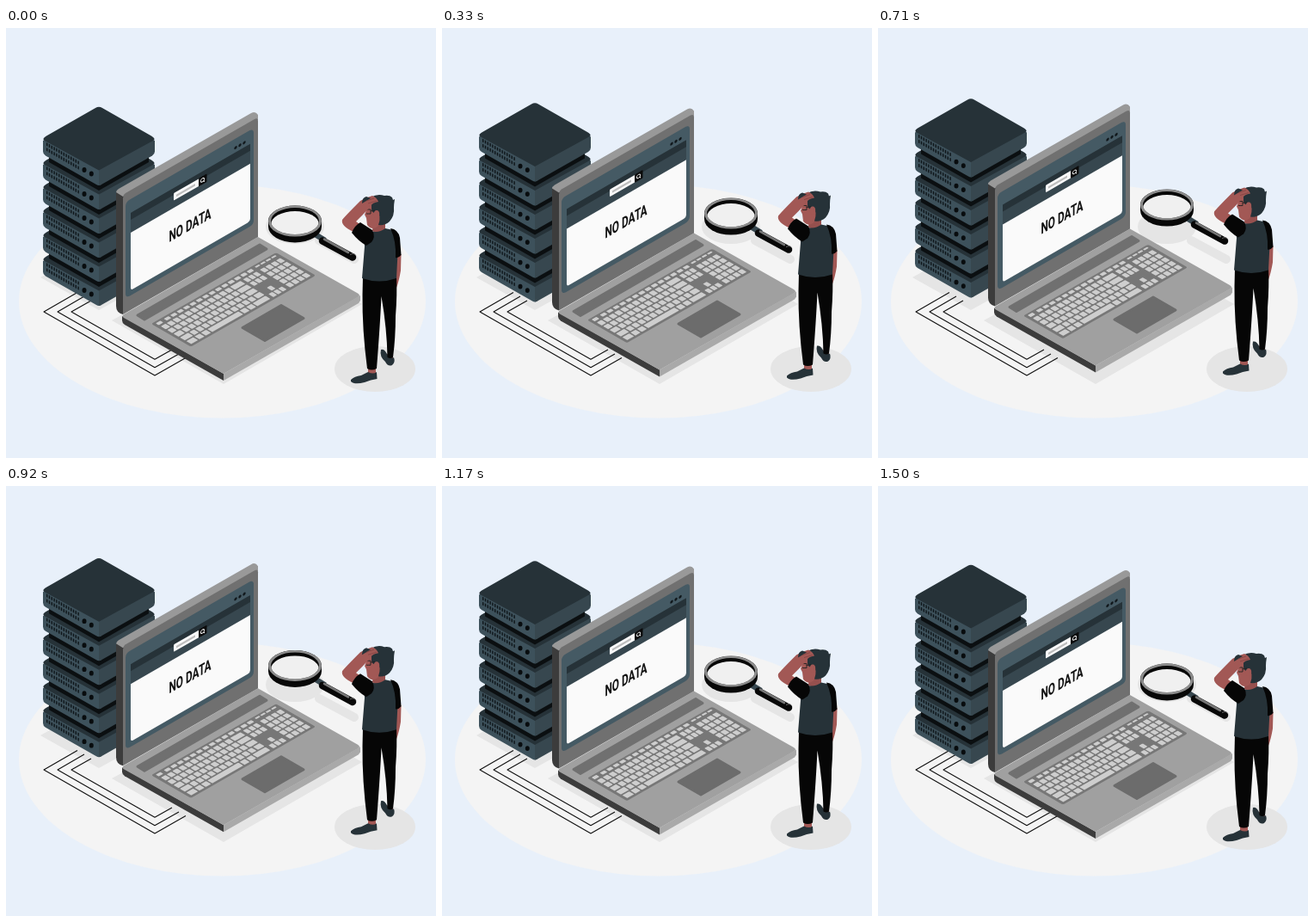
Write an HTML page that moves like this. It is 500x500 px and loops after 1.54 s.

```html
<!DOCTYPE html>
<html lang="en">
<head>
<meta charset="utf-8">
<title>No data</title>
<style>
  html, body { margin: 0; width: 100%; height: 100%; overflow: hidden; background: #e8f0fa; }
  svg { display: block; width: 100%; height: 100%; }
  .round { stroke-width: 3; stroke-linejoin: round; }
  text { font: 600 18px Roboto, sans-serif; text-anchor: middle; }
</style>
</head>
<body>
<svg viewBox="0 0 500 500">
  <ellipse cx="251.500" cy="318" rx="236.500" ry="135.500" fill="#f4f4f4"/>

  <g fill="#e5e5e5">
    <path d="M108 253L175 291L108 328L40 290Z"/>
    <path d="M123 340L253 414L414 321L290 250Z"/>
    <ellipse cx="336" cy="231" rx="34" ry="20"/>
    <path d="M364 247L405 269" stroke="#e5e5e5" stroke-width="10" stroke-linecap="round"/>
    <ellipse cx="429" cy="396.500" rx="47" ry="26.500"/>
  </g>

  <g fill="none" stroke="#111" stroke-width="1.100" stroke-linejoin="round">
    <path d="M83 307.500L44 330L173 404L209 383.500"/>
    <path d="M91 312L60 330L173 394.800L201 379"/>
    <path d="M99 317L76 330L173 385.300L193 374"/>
  </g>

  <g id="server" class="float"></g>

  <g class="float">
    <!-- keyboard half -->
    <path d="M135 335L253 402V410L138 345Q135 343 135 340Z" fill="#3c3c3c"/>
    <path d="M253 402L412 311V317L410 320L253 410Z" fill="#a9a9a9"/>
    <path d="M137 333L293 243L409 308.500Q413 311 409 313L253 402L137 337Q134 335 137 333Z" fill="#a0a0a0"/>
    <path class="round" d="M153 334L295 252L303 257L161 339Z" fill="#707070" stroke="#707070"/>
    <g id="keyboard" transform="matrix(1 -.572 1 .58 169 344)">
      <rect width="145" height="46" rx="2" fill="#777"/>
    </g>
    <path class="round" d="M275 348.500L320 322.500L346 337.500L301 363.500Z" fill="#6c6c6c" stroke="#6c6c6c"/>

    <!-- lid -->
    <path d="M128 191L136 194V333Q128 331 128 323Z" fill="#3c3c3c"/>
    <path d="M128 191Q128 189 131 187L285 99Q290 96 293 101V107L136 196Z" fill="#999"/>
    <path d="M136 198Q136 194 139 192L289 106Q293 104 293 108V243L136 333Z" fill="#707070"/>
    <g transform="matrix(1 -.577 0 1 145 206)">
      <rect x="-6" y="-7" width="149" height="112" rx="5" fill="#455a64"/>
      <rect y="9" width="139" height="90" rx="3" fill="#37474f"/>
      <rect y="9" width="139" height="8" fill="#263238"/>
      <path d="M0 32H139V96Q139 99 136 99H3Q0 99 0 96Z" fill="#fafafa"/>
      <g fill="#10171b">
        <circle cx="122" cy="3.500" r="1.700"/>
        <circle cx="127" cy="3.500" r="1.700"/>
        <circle cx="132" cy="3.500" r="1.700"/>
      </g>
      <rect x="50" y="15" width="30" height="8.500" rx="1" fill="#fafafa"/>
      <path d="M53 19.500H75" stroke="#bdbdbd" stroke-width="2.500"/>
      <rect x="79" y="14.500" width="9.500" height="9.500" rx="1" fill="#0b0b0b"/>
      <path d="M84.500 20.500L86 22" stroke="#fff"/>
      <circle cx="83.500" cy="19" r="2" fill="none" stroke="#fff" stroke-width=".9"/>
      <text transform="translate(69 69) scale(.66 1)" fill="#111">NO DATA</text>
    </g>
  </g>

  <g id="glass">
    <path d="M357 238.500L371 247" stroke="#37474f" stroke-width="6.500"/>
    <path d="M368 247.500L403 266.500" stroke="#080808" stroke-width="8.500" stroke-linecap="round"/>
    <path d="M370 245.500L398 261" stroke="#777" stroke-width="2.600" stroke-linecap="round"/>
    <path d="M400 263.500Q405 261 407 265" stroke="#666" fill="none"/>
    <path d="M305 224.500A31 18 0 0 1 367 224.500V231A31 18.500 0 0 1 305 231Z" fill="#080808"/>
    <ellipse cx="336" cy="224.500" rx="31" ry="18" fill="#8c8c8c"/>
    <clipPath id="hole"><ellipse cx="336" cy="224.500" rx="28" ry="15.500"/></clipPath>
    <g clip-path="url(#hole)">
      <path d="M300 200H370V245H300Z" fill="#080808"/>
      <ellipse cx="336" cy="228.500" rx="28" ry="15.500" fill="#f0f0f0"/>
    </g>
  </g>

  <g class="float">
    <!-- legs and shoes -->
    <g fill="#a25855">
      <path d="M443 379H450V387H445Z"/>
      <path d="M421 393H430V403H421Z"/>
      <path d="M453 262L459.500 263L459 282Q457 294 454 302Q452 298 453 290Z"/>
    </g>
    <g fill="#263238">
      <path d="M436 374Q440 373 443 379Q447 385 451 383Q453 389 449 392Q444 394 441 388Q434 382 436 374Z"/>
      <path d="M401 409Q405 405 413 404L421 400Q427 403 431 400L431.500 408Q424 409 417 412Q405 415 401 411Z"/>
    </g>
    <path d="M415 288H454Q455 310 453 335Q453 360 450 383Q447 385 443.500 383Q443 350 436.500 312Q435 345 431 396Q425 399 420 396Q414 350 414.500 310Z" fill="#060606"/>

    <!-- neck, face and raised arm -->
    <path d="M427 225L441 225L441 237Q433 241 426 236Z" fill="#96504e"/>
    <path d="M419 203L432 202L440 218L432 231Q425 236 420 229L419 221L417 217L419 212Z" fill="#a25855"/>
    <path d="M424 197Q432 192 440 195Q446 194 449 197L450 200L452 199Q451 205 451 209Q452 218 446 225Q441 230 433 229Q437 218 431 212Q427 218 425 211L425 205L416 203Z" fill="#263238"/>
    <ellipse cx="431" cy="216.500" rx="3.200" ry="4.500" fill="#a25855"/>
    <path d="M418 211H424V216H419M424 213L429 212" fill="none" stroke="#222" stroke-width=".9"/>

    <!-- shirt -->
    <path d="M424 236Q433 239 441 233L450 235Q457 239 456 252L454 291Q434 298 414 291L417 254L416 241Z" fill="#263238"/>
    <path d="M447 233Q456 234 458 244L459.500 264Q456 268 453 267Q454 248 447 233Z" fill="#060606"/>
    <path d="M404 237Q389 230 391 223Q394 219 412 201Q419 197 426 195Q431 197 433 202Q426 203 424 207Q420 212 415 217L407 225L414 230Z" fill="#a25855"/>
    <path d="M414 204Q414 197 419 196L424 198Z" fill="#263238"/>
    <path d="M419 201L428 198M421 204L431 201" stroke="#7d403f" stroke-width=".7"/>
    <path d="M402 238Q405 230 412 226L426 235Q430 243 425 249L419 253Q410 248 402 238Z" fill="#060606"/>
  </g>
</svg>
<script>
const $ = id => document.getElementById(id);

// One rack unit: y is the centre of its top surface.
function unit(y, covered) {
  const vents = [7, 13].map(v =>
    `<path transform="matrix(1 .577 0 1 47 0)" d="M0 ${v}H38" stroke="#0d1418" stroke-width="3.700" stroke-dasharray="1.4 1.4"/>`);
  const knobs = [[91, 37], [99.3, 41.5]].map(([x, dy]) =>
    `<ellipse cx="${x}" cy="${dy}" rx="2.5" ry="2.9" fill="#080c0e"/>`);
  const spacer = covered
    ? '<path d="M50 0L108 33L166 0V-11L108 -30L50 -11Z" fill="#0b0f11"/>' : '';
  return `<g transform="translate(0 ${y})">
    <path d="M108 -30L43 3V15.500Q43 18.500 46 20.500L105 54Q108 56 111 54V-30Z" fill="#3d515b"/>
    <path d="M108 -30L173 3V15.500Q173 18.500 170 20.500L111 54L108 55Z" fill="#37474f"/>
    <path d="M104 -35Q108 -37.500 112 -35L169 -2.500Q175 1 171 3L108 37.500L45 3Q41 1 47 -2.500Z" fill="#263238"/>
    ${vents.join('')}${knobs.join('')}${spacer}</g>`;
}
for (let i = 5; i >= 0; i--) $('server').innerHTML += unit(128 + 28 * i, i > 0);

const key = (u, v, w, h = 5.8) =>
  `<rect x="${u}" y="${v}" width="${w}" height="${h}" rx=".7" fill="#cecece"/>`;
let keys = '';
for (let i = 0; i < 15; i++) keys += key(3 + i * 7.4 + (i > 0) * 2, 2, 5.4, 3.6);
for (let i = 0; i < 4; i++) keys += key(118 + i * 6.3, 2, 5, 2);
for (let row = 0; row < 5; row++) {
  const v = 8 + row * 7.4, indent = row < 4 ? row * 2 : 0;
  if (row < 4) {
    if (indent) keys += key(3, v, indent + 3.5);
    for (let u = 3 + (indent ? indent + 5 : 0); u < 86; u += 6.7) keys += key(u, v, 5.3);
    keys += key(88, v, 7.5);
  } else {
    for (const [u, w] of [[3, 8], [12.5, 6], [20, 6], [27.5, 36], [65, 6], [72.5, 6], [80, 15]]) keys += key(u, v, w);
  }
  // navigation block above, arrow keys below
  for (let i = 0; i < 3; i++) {
    if (row < 2 || row === 4 || (row === 3 && i === 1)) keys += key(98.5 + i * 5.6, v, 4.4);
  }
  for (let i = 0; i < 4; i++) keys += key(118 + i * 6.3, v, 5);
}
$('keyboard').innerHTML += keys;

// Linear bob: up for 750 ms, down for 750 ms, stepped at 24 fps.
const LOOP = 1540, FRAME = 1000 / 24;
const floaters = document.querySelectorAll('.float');
function draw(now) {
  const time = Math.floor((now % LOOP + 5) / FRAME) * FRAME;
  const lift = Math.max(0, 1 - Math.abs(1 - time / 750));
  for (const g of floaters) g.setAttribute('transform', `translate(0 ${-10 * lift})`);
  $('glass').setAttribute('transform', `translate(0 ${-20 * lift})`);
}
const start = performance.now();
function tick() {
  draw(performance.now() - start);
  requestAnimationFrame(tick);
}
tick();
</script>
</body>
</html>
```
